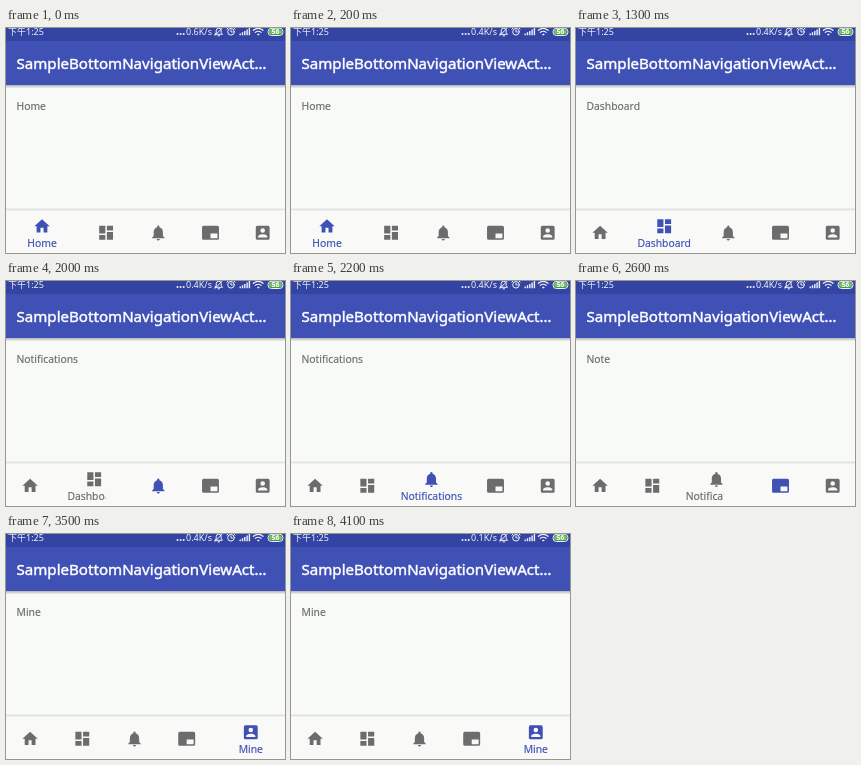
Recreate the animation shown at these times as an HTML page. Size 279x225 px, loop 4.2 s.

```html
<!DOCTYPE html>
<html lang="en">
<head>
<meta charset="utf-8">
<title>Bottom navigation</title>
<style>
  html, body { margin: 0; width: 100%; height: 100%; overflow: hidden; background: #f8faf7; }
  svg { display: block; }
  text { font-family: "Noto Sans", "Noto Sans CJK SC", "Noto Sans CJK", sans-serif; font-size: 10.35px; stroke-width: .15px; }
  .status { font-size: 9px; fill: #f0f2fb; }
  .title { font-size: 15.1px; fill: #fff; stroke: #fff; stroke-width: .45px; }
  .line { fill: none; stroke: #f0f2fb; stroke-linecap: round; stroke-linejoin: round; }
</style>
</head>
<body>
<svg id="stage" width="279" height="225" viewBox="0 0 279 225">
  <defs>
    <linearGradient id="drop" x2="0" y2="1">
      <stop offset="0" stop-color="#000" stop-opacity=".28"/>
      <stop offset="1" stop-color="#000" stop-opacity="0"/>
    </linearGradient>
    <linearGradient id="rise" x2="0" y2="1">
      <stop offset="0" stop-color="#000" stop-opacity="0"/>
      <stop offset="1" stop-color="#000" stop-opacity=".14"/>
    </linearGradient>
    <clipPath id="barClip"><rect y="182.5" width="279" height="43"/></clipPath>
  </defs>

  <rect width="279" height="225" fill="#f8faf7"/>
  <rect y="57" width="279" height="3.5" fill="url(#drop)"/>
  <rect width="279" height="57" fill="#3f51b5"/>
  <rect width="279" height="13" fill="#3444a2"/>

  <g transform="translate(0 -.7)">
    <text class="status" x="2" y="8">下午1:25</text>
    <g fill="#f0f2fb">
      <circle cx="171.5" cy="6.7" r="1"/>
      <circle cx="174.6" cy="6.7" r="1"/>
      <circle cx="177.7" cy="6.7" r="1"/>
    </g>
    <text class="status" id="speed" x="180" y="8"></text>
    <g class="line" stroke-width="1">
      <path d="M209 7h7.5l-1.3-1.6V3.4a2.5 2.5 0 0 0-5 0v2zM212 8.5h1.6M208.8 8.2l7.8-7.8"/>
      <circle cx="225" cy="4.5" r="3.3"/>
      <path d="M225 2.8v1.9h1.4M220.9 1.8l1.5-1.4M229.1 1.8l-1.5-1.4"/>
      <path stroke-linecap="butt" stroke-width="1.4" d="M234.2 8V6.2M236.5 8V5M238.8 8V3.7M241.1 8V2.3M243.4 8V.8"/>
      <path stroke-width="1.2" d="M247.4 3a7 7 0 0 1 9.6 0M249.3 5.1a4.2 4.2 0 0 1 5.8 0"/>
      <circle cx="252.2" cy="7.2" r=".6"/>
    </g>
  </g>
  <rect class="line" x="262" y=".3" width="15" height="7.2" rx="3.4"/>
  <rect x="263" y="1.2" width="13" height="5.4" rx="2.5" fill="#6cc94f"/>
  <text x="269.5" y="6.2" text-anchor="middle" fill="#fff" style="font-size:6.4px;font-weight:600">56</text>

  <text class="title" x="10.5" y="41">SampleBottomNavigationViewAct…</text>
  <text id="content" x="10.5" y="82" fill="#6c6e6c" stroke="#6c6e6c"></text>

  <rect y="179.5" width="279" height="3" fill="url(#rise)"/>
  <rect y="182.5" width="279" height="43" fill="#f9faf8"/>
  <g clip-path="url(#barClip)"><circle id="ripple" fill="#3f51b5" fill-opacity=".08"/></g>
  <g id="nav"></g>
</svg>
<script>
const LOOP = 4200, STEP = 100, SLIDE = 100;
const LEFT = -2, NARROW = 52.2, WIDE = 76;
const GREY = '#6b6c6b', BLUE = '#3f51b5';
const BASE = 219;
const ITEMS = [
  ['Home', 'M10 20v-6h4v6h5v-8h3L12 3 2 12h3v8z'],
  ['Dashboard', 'M3 13h8V3H3zm0 8h8v-6H3zm10 0h8V11h-8zm0-18v6h8V3z'],
  ['Notifications', 'M12 22c1.1 0 2-.9 2-2h-4c0 1.1.9 2 2 2zm6-6v-5c0-3.07-1.64-5.64-4.5-6.32V4a1.5 1.5 0 0 0-3 0v.68C7.63 5.36 6 7.92 6 11v5l-2 2v1h16v-1z'],
  ['Note', 'M21 3H3a2 2 0 0 0-2 2v14a2 2 0 0 0 2 2h18a2 2 0 0 0 2-2V5a2 2 0 0 0-2-2zm0 16h-9v-6h9z'],
  ['Mine', 'M3 5v14a2 2 0 0 0 2 2h14a2 2 0 0 0 2-2V5a2 2 0 0 0-2-2H5a2 2 0 0 0-2 2zm12 4a3 3 0 0 1-6 0 3 3 0 0 1 6 0zm-9 8c0-2 4-3.1 6-3.1s6 1.1 6 3.1v1H6z']
];
// When each tab is picked, and when its ripple has gone
const PICKS = [
  { at: -1000, calm: 0 },
  { at: 1040, calm: 1300 },
  { at: 2000, calm: 2200 },
  { at: 2600, calm: 2900 },
  { at: 3200, calm: 3300 }
];

const $ = id => document.getElementById(id);
const mix = (a, b, p) => a + (b - a) * p;

function add(parent, tag, attrs) {
  const el = document.createElementNS('http://www.w3.org/2000/svg', tag);
  set(el, attrs);
  parent.append(el);
  return el;
}

function set(el, attrs) {
  for (const k in attrs) el.setAttribute(k, attrs[k]);
}

function write(el, str) {
  if (el.textContent !== str) el.textContent = str;
}

const tabs = ITEMS.map(([name, d]) => {
  const icon = add($('nav'), 'path', { d, 'fill-rule': 'evenodd' });
  const group = add($('nav'), 'g', {});
  const box = add(group, 'svg', { y: -12, height: 18 });
  const label = add(box, 'text', { y: 12 });
  label.textContent = name;
  return { name, icon, group, box, label };
});

// Centre of tab i while tab `on` is the wide one
function centre(i, on) {
  return LEFT + i * NARROW + (i > on ? WIDE - NARROW : 0) + (i === on ? WIDE : NARROW) / 2;
}

function drawTab(tab, i, on, p) {
  const was = Math.max(on - 1, 0);
  const x = mix(centre(i, was), centre(i, on), p);
  const lift = i === on ? p : i === was ? 1 - p : 0;
  const colour = i === on ? BLUE : GREY;
  set(tab.icon, {
    fill: colour,
    transform: `translate(${x} ${204.8 - 6.5 * lift}) scale(.77) translate(-12 -12)`
  });

  // The label grows from half size and is cut at the right of its box
  const full = tab.label.getComputedTextLength();
  const room = i === on ? mix(38, p < 1 ? 55 : WIDE, p) : 38;
  const span = i === on ? Math.min(full, room) : full;
  set(tab.group, {
    opacity: lift ** 1.5,
    transform: `translate(${x} ${BASE}) scale(${mix(.5, 1, lift)})`
  });
  set(tab.box, { x: -span / 2, width: Math.min(full + 1, room) });
  set(tab.label, { fill: colour, stroke: colour });
}

function draw(time) {
  const t = Math.floor(time % LOOP / STEP) * STEP;
  const on = PICKS.findLastIndex(pick => t >= pick.at);
  const { at, calm } = PICKS[on];
  const age = t - at;
  const p = 1 - (1 - Math.min(age / SLIDE, 1)) ** 2;

  write($('speed'), `0.${t < 200 ? 6 : t < 3900 ? 4 : 1}K/s`);
  write($('content'), tabs[on].name);
  tabs.forEach((tab, i) => drawTab(tab, i, on, p));

  const r = t < calm ? 26 * Math.min(1, (age / 85) ** 2) : 0;
  const x = mix(centre(on, Math.max(on - 1, 0)), centre(on, on), p);
  set($('ripple'), { cx: x + 6 * (1 - r / 26), cy: 205, r });
}

const start = performance.now();
function tick() {
  draw(performance.now() - start);
  requestAnimationFrame(tick);
}
tick();
</script>
</body>
</html>
```
